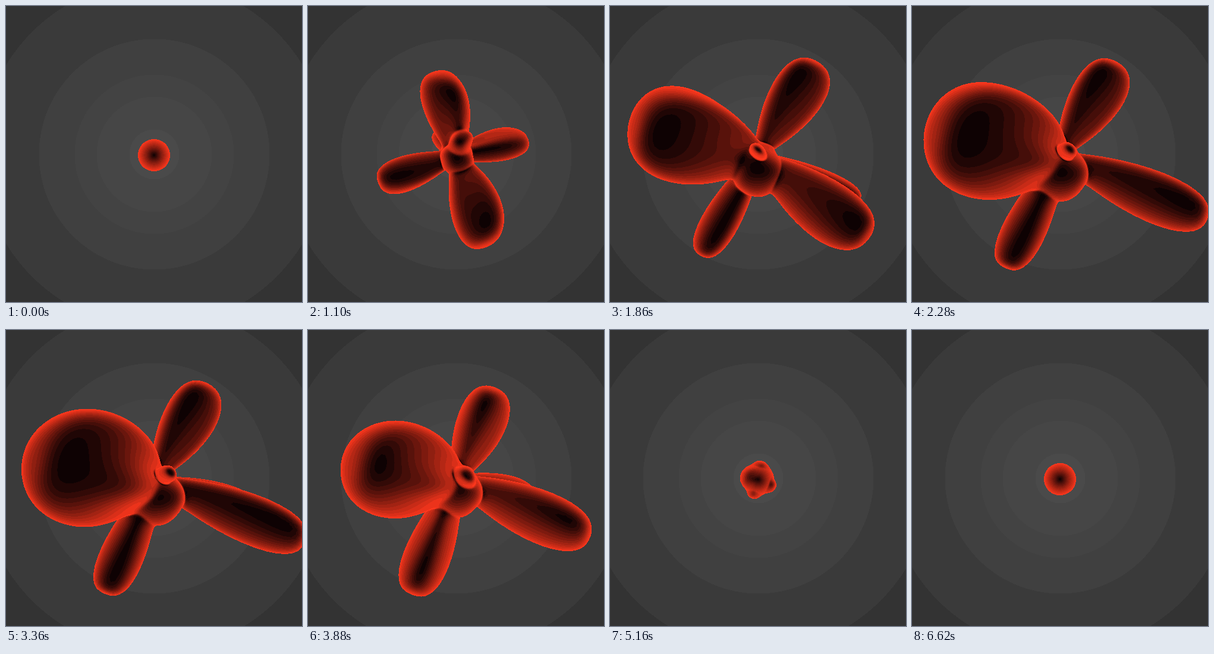
Recreate the animation shown at these times as an HTML page with a canvas. Size 498x498 px, loop 6640 ms.

```html
<!DOCTYPE html>
<html lang="en">
<head>
<meta charset="utf-8">
<title>Blob</title>
<style>
html, body { margin: 0; width: 100%; height: 100%; overflow: hidden; background: #333; }
canvas { display: block; }
</style>
</head>
<body>
<canvas id="stage" width="498" height="498"></canvas>
<script>
// A sphere pushed out into lobes, shaded by how far each facet turns from the viewer.
const SIZE = 498, LOOP = 6640, CX = 249, CY = 251, R = 27;
const ROWS = 150, COLS = 220, COUNT = (ROWS + 1) * COLS;
const LEVELS = 13, WARP = 0.06;

const ctx = document.getElementById('stage').getContext('2d');

// Each lobe: tip x, y, z from the centre (z towards the viewer) and angular width.
// Order: top, right, lower left, left, front, bulb, core.
const sprout = { contrast: 1.9, lobes: [
  [-24, -140, 40, .52], [118, -28, -40, .38], [-32, -38, -50, .4], [-128, 54, 10, .38],
  [58, 148, 50, .45], [12, -32, 62, .45], [5, 15, 45, .9]] };
const burst = { contrast: 2.5, lobes: [
  [100, -170, 30, .4], [142, 72, -30, .34], [-88, 128, -60, .32], [-185, -58, 60, .4],
  [42, 212, 130, .43], [-8, -5, 125, .18], [10, 30, 62, 1]] };
const bloom = { contrast: 2.7, lobes: [
  [94, -158, 40, .4], [185, 58, -50, .24], [-88, 192, 20, .36], [-208, -52, 140, .75],
  [248, 115, 60, .31], [22, -10, 130, .19], [0, 62, 58, 1]] };
const knot = { contrast: .75, lobes: [
  [18, -72, 15, .42], [30, 20, -45, .5], [-26, 96, 12, .42], [-68, -14, 48, .65],
  [86, 46, 25, .4], [5, 0, 32, .4], [0, 10, 40, .9]] };

const lerp = (a, b, u) => a + (b - a) * u;
const cubicOut = u => 1 - (1 - u) ** 3;

const mix = (a, b, u) => ({
  contrast: lerp(a.contrast, b.contrast, u),
  lobes: a.lobes.map((lobe, i) => lobe.map((v, k) => lerp(v, b.lobes[i][k], u)))
});

// Scales how far the lobes rise above the sphere; 0 is the bare sphere.
const grow = (pose, amount) => ({
  contrast: lerp(1, pose.contrast, amount),
  lobes: pose.lobes.map(([x, y, z, w]) => {
    const k = lerp(R / Math.hypot(x, y, z), 1, amount);
    return [x * k, y * k, z * k, w];
  })
});

const turn = (pose, roll, yaw) => ({
  contrast: pose.contrast,
  lobes: pose.lobes.map(([x, y, z, w]) => {
    const x1 = x * Math.cos(roll) - y * Math.sin(roll);
    const y1 = x * Math.sin(roll) + y * Math.cos(roll);
    return [x1 * Math.cos(yaw) + z * Math.sin(yaw), y1, z * Math.cos(yaw) - x1 * Math.sin(yaw), w];
  })
});

const drift = q => turn(bloom, -.04 * q, .1 * q);
const settle = t => grow(knot, .95 * Math.exp((4200 - t) / 420) + .05 * Math.exp((4200 - t) / 40));

function poseAt(t) {
  if (t < 1100) return grow(sprout, (t / 1100) ** 3);
  if (t < 1520) return mix(sprout, burst, (t - 1100) / 420);
  if (t < 2000) return mix(burst, drift(-1), (t - 1520) / 480);
  if (t < 3360) return drift(2 * cubicOut((t - 2000) / 1360) - 1);
  if (t < 4100) return mix(drift(1), settle(4100), ((t - 3360) / 740) ** 2.2);
  return settle(t);
}

const swell = t => t > 3360 && t < 4100 ? 1 + .15 * Math.sin(Math.PI * (t - 3360) / 740) : 1;

// Unit directions of the mesh, plus slightly warped copies that give the lobes uneven folds.
const dir = new Float64Array(COUNT * 3), bent = new Float64Array(COUNT * 3);
for (let r = 0, i = 0; r <= ROWS; r++) {
  const polar = lerp(.001, Math.PI - .001, r / ROWS);
  for (let c = 0; c < COLS; c++, i += 3) {
    const a = 2 * Math.PI * c / COLS;
    const x = Math.sin(polar) * Math.cos(a), y = Math.sin(polar) * Math.sin(a), z = Math.cos(polar);
    dir.set([x, y, z], i);
    bent.set([
      x + WARP * Math.sin(6 * y + 2 * z + 1),
      y + WARP * Math.sin(6 * z + 2 * x + 3),
      z + WARP * Math.sin(6 * x + 2 * y + 5)], i);
  }
}

const pos = new Float64Array(COUNT * 3), tone = new Float64Array(COUNT);

function shape(pose, scale) {
  const lobes = pose.lobes.map(([x, y, z, w]) => {
    const len = Math.hypot(x, y, z);
    return { x: x / len, y: y / len, z: z / len, height: len - R, w2: w * w };
  });
  for (let i = 0; i < COUNT * 3; i += 3) {
    let sum = 0;
    for (const l of lobes) {
      const dx = bent[i] - l.x, dy = bent[i + 1] - l.y, dz = bent[i + 2] - l.z;
      const q = (dx * dx + dy * dy + dz * dz) / l.w2;
      if (q < 5) sum += (l.height * Math.exp(-q * Math.sqrt(q))) ** 3;
    }
    const radius = (R + Math.cbrt(sum)) * scale;
    pos[i] = CX + dir[i] * radius;
    pos[i + 1] = CY + dir[i + 1] * radius;
    pos[i + 2] = dir[i + 2] * radius;
  }
}

function shade(contrast) {
  for (let r = 0; r <= ROWS; r++) {
    const up = Math.max(r - 1, 0) * COLS, down = Math.min(r + 1, ROWS) * COLS;
    for (let c = 0; c < COLS; c++) {
      const a = (up + c) * 3, b = (down + c) * 3;
      const d = (r * COLS + (c + COLS - 1) % COLS) * 3, e = (r * COLS + (c + 1) % COLS) * 3;
      const ux = pos[b] - pos[a], uy = pos[b + 1] - pos[a + 1], uz = pos[b + 2] - pos[a + 2];
      const vx = pos[e] - pos[d], vy = pos[e + 1] - pos[d + 1], vz = pos[e + 2] - pos[d + 2];
      const nx = uy * vz - uz * vy, ny = uz * vx - ux * vz, nz = ux * vy - uy * vx;
      const side = nx * nx + ny * ny;
      tone[r * COLS + c] = Math.sqrt(side / (side + nz * nz || 1)) ** contrast;
    }
  }
}

const pack = (r, g, b) => (255 << 24 | b << 16 | g << 8 | r) >>> 0;
const reds = Array.from({ length: LEVELS + 1 }, (_, i) => {
  const v = i / LEVELS;
  return pack(14 + 241 * v, 2 + 54 * v, 3 + 26 * v);
});

const image = ctx.createImageData(SIZE, SIZE);
const pixels = new Uint32Array(image.data.buffer);
const depth = new Float32Array(SIZE * SIZE);

function triangle(a, b, c) {
  const ax = pos[a * 3], ay = pos[a * 3 + 1], az = pos[a * 3 + 2];
  const bx = pos[b * 3], by = pos[b * 3 + 1], bz = pos[b * 3 + 2];
  const cx = pos[c * 3], cy = pos[c * 3 + 1], cz = pos[c * 3 + 2];
  const area = (bx - ax) * (cy - ay) - (by - ay) * (cx - ax);
  if (Math.abs(area) < 1e-9) return;
  const x0 = Math.max(0, Math.ceil(Math.min(ax, bx, cx) - .5));
  const x1 = Math.min(SIZE - 1, Math.floor(Math.max(ax, bx, cx) - .5));
  const y0 = Math.max(0, Math.ceil(Math.min(ay, by, cy) - .5));
  const y1 = Math.min(SIZE - 1, Math.floor(Math.max(ay, by, cy) - .5));
  for (let y = y0; y <= y1; y++) {
    for (let x = x0; x <= x1; x++) {
      const px = x + .5 - ax, py = y + .5 - ay;
      const v = (px * (cy - ay) - py * (cx - ax)) / area;
      const w = (py * (bx - ax) - px * (by - ay)) / area;
      const u = 1 - v - w;
      if (u < -1e-6 || v < -1e-6 || w < -1e-6) continue;
      const z = u * az + v * bz + w * cz, k = y * SIZE + x;
      if (z <= depth[k]) continue;
      depth[k] = z;
      const s = u * tone[a] + v * tone[b] + w * tone[c];
      pixels[k] = reds[Math.max(0, Math.min(LEVELS, Math.round(s * LEVELS)))];
    }
  }
}

function makeBackdrop() {
  const bands = [[42, 74], [97, 70], [134, 67], [194, 64], [291, 58], [Infinity, 51]];
  return Uint32Array.from({ length: SIZE * SIZE }, (_, i) => {
    const d = Math.hypot(i % SIZE - CX, Math.floor(i / SIZE) - 249);
    const grey = bands.find(([r]) => d < r)[1];
    return pack(grey, grey, grey);
  });
}
const backdrop = makeBackdrop();

function render(t) {
  const pose = poseAt(t);
  shape(pose, swell(t));
  shade(pose.contrast);
  pixels.set(backdrop);
  depth.fill(-1e6);
  for (let r = 0; r < ROWS; r++) {
    for (let c = 0; c < COLS; c++) {
      const next = (c + 1) % COLS, a = r * COLS, b = a + COLS;
      triangle(a + c, a + next, b + c);
      triangle(a + next, b + next, b + c);
    }
  }
  ctx.putImageData(image, 0, 0);
}

let start;
function tick(now) {
  start ??= now;
  render(Math.max(0, now - start) % LOOP);
  requestAnimationFrame(tick);
}
render(0);
requestAnimationFrame(tick);
</script>
</body>
</html>
```
